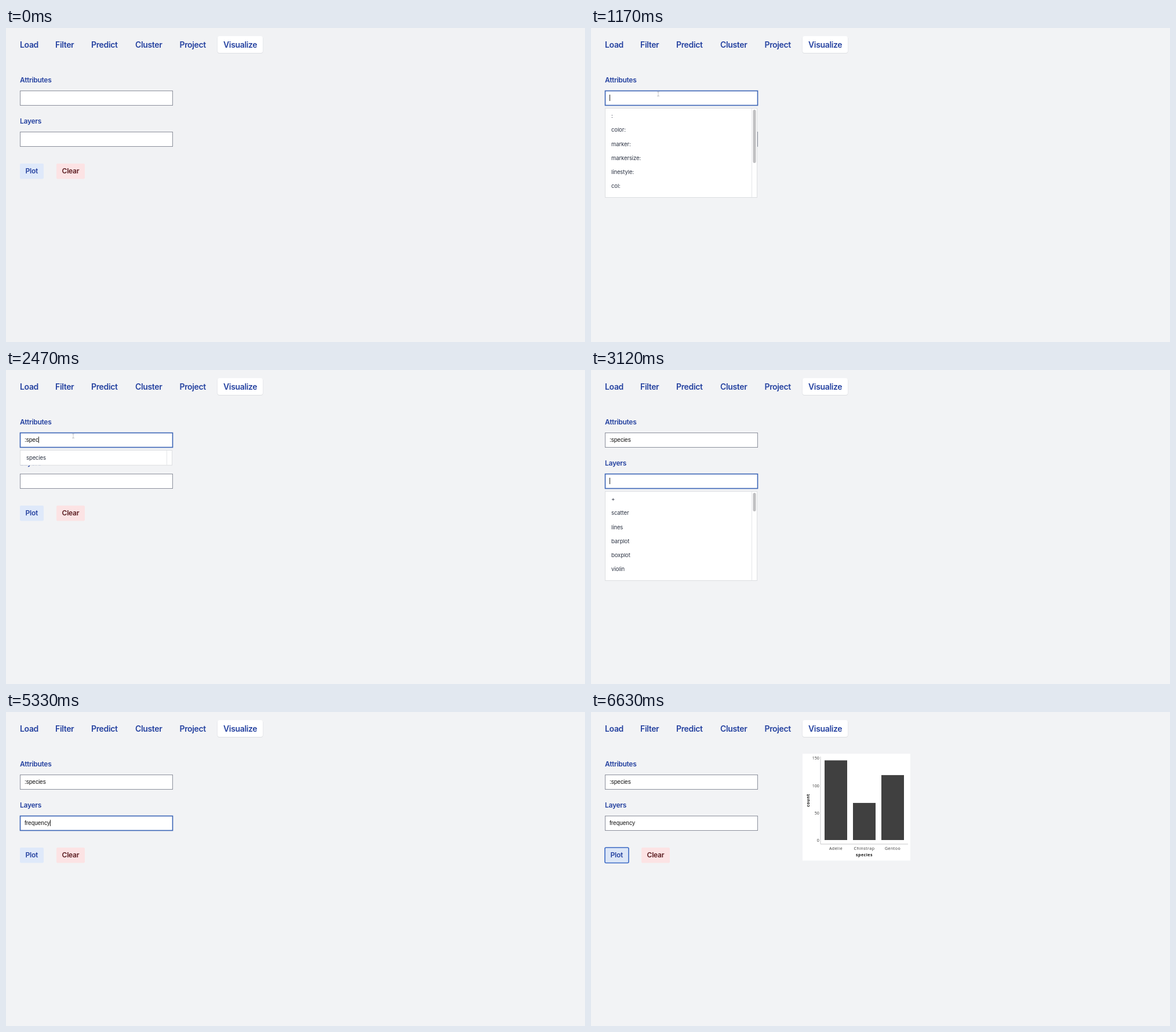
Write an HTML page that moves like this. It is 999x542 px and loops after 8 s.

```html
<!DOCTYPE html>
<html lang="en">
<head>
<meta charset="utf-8">
<title>Visualize form</title>
<style>
html, body { margin: 0; width: 100%; height: 100%; overflow: hidden; background: #f2f3f5 }
svg { display: block }
text { font-family: Inter, "Open Sans", sans-serif; white-space: pre }
.tab { font-size: 14px; font-weight: 600; letter-spacing: -.35px; fill: #2542a0 }
.label { font-size: 12px; font-weight: 600; letter-spacing: -.3px; fill: #2542a0 }
.button { font-size: 12px; font-weight: 600; letter-spacing: -.2px; fill: #2542a0 }
.danger { fill: #5a1c20 }
.value { font: 10px "Liberation Sans", Arial, sans-serif; fill: #111 }
.option { font-size: 9.5px; letter-spacing: -.1px; fill: #2b3242 }
.tick, .name, .title { font-family: "Open Sans", "Noto Sans", sans-serif; font-size: 7px; fill: #333 }
.tick { text-anchor: end }
.name, .title { text-anchor: middle; letter-spacing: .5px }
.title { font-weight: 700; fill: #111 }
</style>
</head>
<body>
<svg id="stage" width="999" height="542" viewBox="0 0 999 542"></svg>
<script>
const LOOP = 8000;
const stage = document.getElementById('stage');

const keys = { items: [':', 'color:', 'marker:', 'markersize:', 'linestyle:', 'col:'], thumb: 92 };
const columns = {
  items: ['species', 'island', 'bill_length_mm', 'bill_depth_mm', 'flipper_length_mm', 'body_mass_g'],
  thumb: 128
};
const layers = { items: ['+', 'scatter', 'lines', 'barplot', 'boxplot', 'violin'], thumb: 32 };
const only = (...items) => ({ items });

// Each entry overrides the fields that change at that time.
let last = { at: 0, attr: '', layer: '', focus: '', list: null, caret: false, plot: false, bg: '#f1f2f4' };
const states = [
  {},
  { at: 390, bg: '#f2f3f5' },
  { at: 1170, focus: 'attr', list: keys, caret: true },
  { at: 1560, caret: false },
  { at: 1820, attr: ':', list: columns, caret: true },
  { at: 2080, attr: ':s', list: only('species', 'sex') },
  { at: 2210, attr: ':sp', list: only('species') },
  { at: 2470, attr: ':spec' },
  { at: 2730, attr: ':species', list: null },
  { at: 2990, focus: 'layer', list: layers },
  { at: 3640, caret: false },
  { at: 4160, caret: true },
  { at: 4550, layer: 'f', list: only('frequency') },
  { at: 4680, layer: 'fre' },
  { at: 5200, layer: 'frequency', list: null },
  { at: 5720, caret: false },
  { at: 5980, focus: 'plot', bg: '#f1f2f3' },
  { at: 6630, plot: true, bg: '#f2f3f5' }
].map(change => last = { ...last, ...change });

const text = (x, y, s, cls, extra = '') => `<text x="${x}" y="${y}" class="${cls}" ${extra}>${s}</text>`;
const box = (x, y, w, h, fill, extra = '') =>
  `<rect x="${x}" y="${y}" width="${w}" height="${h}" fill="${fill}" ${extra}/>`;
const outline = (color, width = 1) => `stroke="${color}" stroke-width="${width}"`;

function tabs() {
  const names = { Load: 24, Filter: 85, Predict: 147, Cluster: 223, Project: 299.5, Visualize: 375 };
  return box(364.5, 14.5, 79, 29.5, '#dddfe3', 'rx="4"') + box(365, 14, 78, 29, '#fff', 'rx="3.5"') +
    Object.entries(names).map(([s, x]) => text(x, 34, s, 'tab')).join('');
}

function field(y, label, value, focused) {
  const edge = focused ? outline('#3a63b5', 1.6) : outline('#8b8f9b');
  return text(24, y - 14, label, 'label') +
    box(24.5, y + .5, 263, 25, '#fff', edge) +
    text(32, y + 16, value, focused ? 'value active' : 'value');
}

function buttons(focused) {
  const ring = focused ? outline('#3a68c4', 1.6) : '';
  return box(24, 234, 41, 26.5, focused ? '#dce6f7' : '#dfe9fa', 'rx="2" ' + ring) +
    text(33.5, 251, 'Plot', 'button') +
    box(87, 234, 49, 26.5, '#fce3e4', 'rx="2"') +
    text(96.5, 251, 'Clear', 'button danger');
}

function dropdown(y, { items, thumb }) {
  const h = items.length * 24.1 + (items.length > 5 ? 9.4 : 1.7);
  return box(24.5, y + .5, 262, h, '#fff', outline('#dcdee1')) +
    box(277, y + 1, 1, h - 1, '#e4e5e8') +
    (thumb ? box(279.5, y + 3, 5, thumb, '#c0c0c2', 'rx="2.5"') : '') +
    items.map((s, i) => text(35, y + 17.3 + i * 24.1, s, 'option')).join('');
}

function chart() {
  const zero = 221, unit = .942;
  const bars = [['Adelie', 146, 422.5], ['Chinstrap', 68, 471.5], ['Gentoo', 119, 520.5]];
  return box(365, 72, 186, 184.5, '#fff') +
    `<path d="M396 77V228H547" fill="none" stroke="#c9c9cb"/>` +
    [0, 50, 100, 150].map(n => text(393.7, zero + 2.7 - n * unit, n, 'tick')).join('') +
    bars.map(([s, n, x]) => box(x - 19.5, zero - n * unit, 39, n * unit, '#404040') +
      text(x, 238, s, 'name')).join('') +
    text(471.5, 249, 'species', 'title') +
    text(0, 0, 'count', 'title', 'transform="translate(377 152.5) rotate(-90)"');
}

function pointer() {
  return `<path d="M116 110V118M114.5 110.5H117.5M114.5 117.5H117.5" stroke="#8d929c" stroke-dasharray="1 1" fill="none"/>`;
}

function render(s) {
  const inAttr = s.focus === 'attr', inLayer = s.focus === 'layer';
  stage.innerHTML = box(0, 0, 999, 542, s.bg) + tabs() +
    field(108, 'Attributes', s.attr, inAttr) +
    field(179, 'Layers', s.layer, inLayer) +
    buttons(s.focus === 'plot') +
    (s.list ? dropdown(inAttr ? 138 : 209, s.list) : '') +
    (inAttr ? pointer() : '') +
    (s.plot ? chart() : '');
  if (s.caret) {
    const x = 32 + stage.querySelector('.active').getComputedTextLength();
    stage.insertAdjacentHTML('beforeend', box(x, inAttr ? 115 : 186, 1, 11, '#222'));
  }
}

let shown;
function frame(now) {
  const t = now % LOOP;
  const state = states.findLast(s => s.at <= t);
  if (state !== shown) render(shown = state);
  requestAnimationFrame(frame);
}
render(shown = states[0]);
requestAnimationFrame(frame);
</script>
</body>
</html>
```
